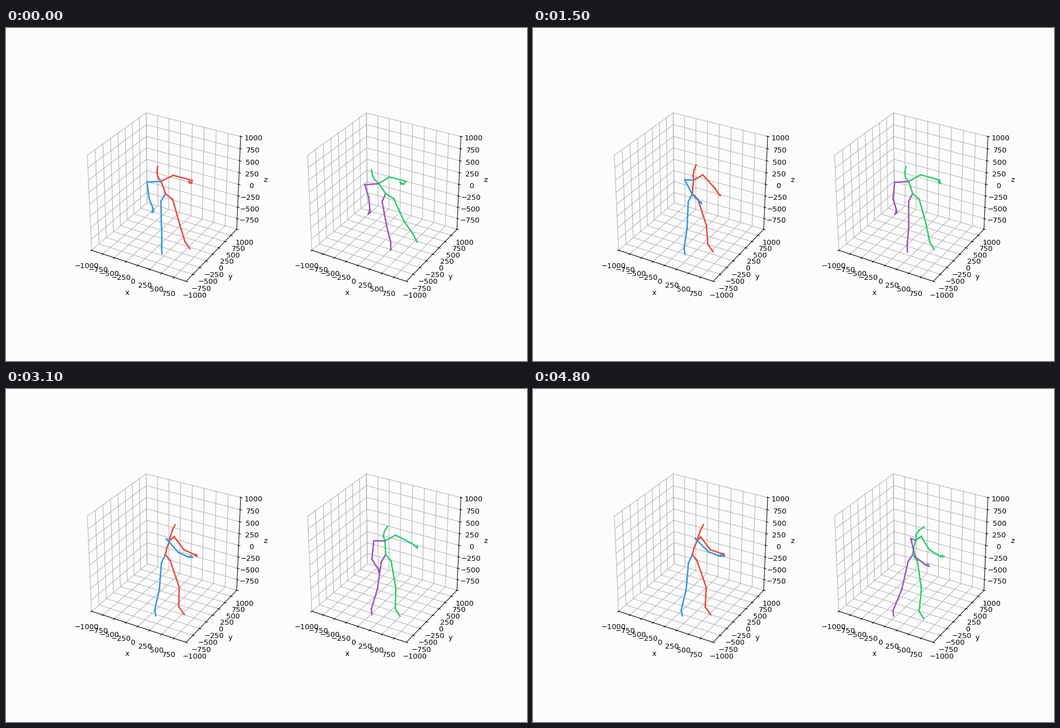
Recreate the animation shown at these times as a matplotlib script. Size 935 px wide and 599 px high, loop 4.9 s.

```python
import numpy as np
import matplotlib.pyplot as plt
from matplotlib.animation import FuncAnimation
from matplotlib.collections import LineCollection

W, H, DPI = 935, 599, 93.5
STEP, FRAMES = 100, 49
BG = "#fcfcfc"
BLUE, RED, PURPLE, GREEN = "#3498db", "#e74c3c", "#9b59b6", "#2ecc71"


def ease(s, p, q):
    """p > 1 softens the start, q > 1 softens the end."""
    return 1 - (1 - s ** p) ** q


class Limb:
    """A chain of joints that eases from one pose to another.

    Poses are stage pixels, x then y per joint. With a middle pose, each
    joint follows a parabola through it.
    """

    def __init__(self, color, curve, *poses, hand=False):
        self.curve, self.hand = curve, hand
        poses = [np.reshape(p, (-1, 2)).astype(float) for p in poses]
        self.start, self.end = poses[0], poses[-1]
        self.bow = 0
        if len(poses) == 3:
            self.bow = poses[1] - (self.start + self.end) / 2
        self.line = LineCollection([], colors=color, linewidths=2,
                                   capstyle="projecting")

    def joints(self, s):
        u = ease(s, *self.curve)
        return (self.start + (self.end - self.start) * u
                + 4 * u * (1 - u) * self.bow)

    def draw(self, s, base):
        pts = np.vstack([base, self.joints(s)])
        segs = list(zip(pts[:-1], pts[1:]))
        if self.hand:
            wrist, tip = pts[-2:]
            dx, dy = tip - wrist
            thumb = wrist + 0.6 * (tip - wrist) + 0.3 * np.array([dy, -dx])
            segs.append((wrist, thumb))
        self.line.set_segments(segs)


class Skeleton:
    def __init__(self, ax, root, legs, spine, arms):
        self.root, self.legs, self.spine, self.arms = root, legs, spine, arms
        for limb in (*legs, spine, *arms):
            ax.add_collection(limb.line)

    def pose(self, s):
        for limb in (*self.legs, self.spine):
            limb.draw(s, self.root)
        neck = self.spine.joints(s)[1]
        for arm in self.arms:
            arm.draw(s, neck)


def add_box(fig, pos):
    ax = fig.add_subplot(1, 2, pos, projection="3d", facecolor="none")
    ax.set_box_aspect((1, 1, 1))
    ax.set_xticks(range(-1000, 1000, 250))
    ax.set_yticks(range(-1000, 1001, 250))
    ax.set_zticks(range(-750, 1001, 250))
    ax.set(xlim=(-1001, 999), ylim=(-1000, 1000), zlim=(-990, 1010),
           xlabel="x", ylabel="y", zlabel="z")
    for axis in (ax.xaxis, ax.yaxis, ax.zaxis):
        axis.set_pane_color((1, 1, 1, 0))


fig = plt.figure(figsize=(W / DPI, H / DPI), dpi=DPI, facecolor=BG)
add_box(fig, 1)
add_box(fig, 2)

stage = fig.add_axes((0, 0, 1, 1), facecolor="none")
stage.set(xlim=(0, W), ylim=(H, 0))
stage.axis("off")

# Legs: hip, knee, ankle, toe.  Spine: back, neck, chin, brow, crown.
# Arms: shoulder, elbow, wrist, fingertip.
settle = (1, 2.5)
brisk = Skeleton(
    stage, (286, 298),
    legs=[
        Limb(BLUE, settle, (278, 312, 279, 360, 279, 393, 280, 406),
             (279, 313, 275, 360, 266, 398, 268, 408)),
        Limb(RED, settle, (299, 308, 312, 354, 321, 384, 330, 397),
             (294, 308, 311, 357, 309, 392, 319, 406))],
    spine=Limb(RED, settle,
               (283, 288, 278, 276, 272.5, 268, 271, 259, 272, 249),
               (289, 286, 295, 272, 297, 264, 301, 253, 306, 244)),
    arms=[
        Limb(RED, (1.1, 3), (300, 265, 334, 274, 333, 279, 328, 276),
             (305, 264, 328, 286, 334, 299, 334, 299),
             (301, 266, 318, 289, 338, 296, 344, 300), hand=True),
        Limb(BLUE, (1.35, 3), (253, 277, 257, 307, 264, 325, 262, 332),
             (291, 269, 315, 293, 334, 300, 342, 300), hand=True)])

steady = (1, 1)
slow = Skeleton(
    stage, (681.3, 298),
    legs=[
        Limb(PURPLE, (1, 1.45), (675, 312, 683, 356, 690, 384, 690, 399),
             (673, 311, 662, 360, 646, 399, 647, 408)),
        Limb(GREEN, (1, 1.8), (696, 307, 714, 347, 730, 370, 738, 385),
             (690, 309, 697, 360, 693, 400, 701, 413))],
    spine=Limb(GREEN, (1.1, 1),
               (676, 290, 669, 280, 661, 272, 657.5, 264, 656, 255),
               (680, 286.5, 678, 274, 674, 266, 675, 256.5, 679.5, 247.5),
               (683, 286, 687, 272, 687, 263, 693, 254, 702, 248)),
    arms=[
        Limb(GREEN, steady, (688, 268, 718, 276, 713, 281, 707, 277),
             (698, 263, 730.5, 275, 736.5, 282, 735, 278),
             (697, 265, 711, 289, 731, 301, 737, 301), hand=True),
        Limb(PURPLE, steady, (644, 282, 651, 305, 653, 327, 650, 335),
             (654.5, 275, 650, 307, 659, 326, 658, 333),
             (678, 269, 686, 302, 704, 316, 711, 319), hand=True)])


def draw(frame):
    for body in (brisk, slow):
        body.pose(frame / (FRAMES - 1))


anim = FuncAnimation(fig, draw, frames=FRAMES, interval=STEP,
                     repeat=True, repeat_delay=0)
plt.show()
```
